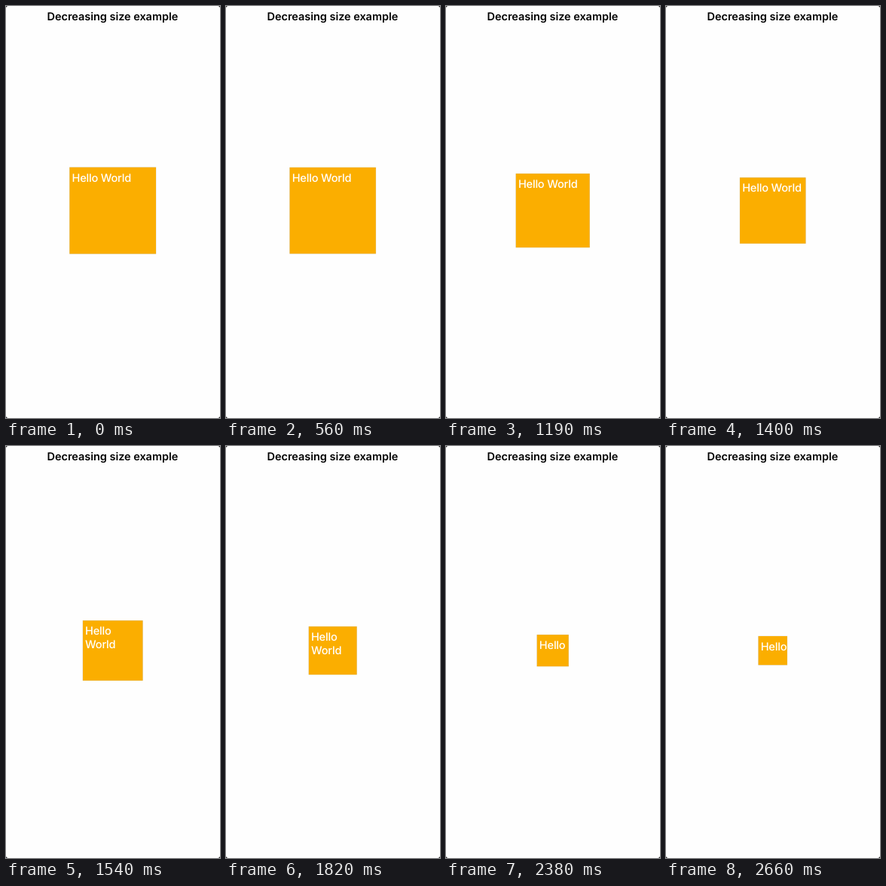
Write an HTML page that moves like this. It is 284 px wide and 546 px high and loops after 3080 ms.

```html
<!DOCTYPE html>
<html lang="en">
<head>
<meta charset="utf-8">
<style>
  html, body { margin: 0; width: 100%; height: 100%; overflow: hidden; background: #000; }
  svg { display: block; width: 284px; height: 546px; }
  text { font-family: Inter, "Liberation Sans", sans-serif; white-space: pre; text-rendering: geometricPrecision; }
  #title { font-size: 14.5px; font-weight: 600; letter-spacing: -.04px; text-anchor: middle; }
  #label { font-size: 14.6px; font-weight: 500; letter-spacing: -.2px; fill: #fff; }
</style>
</head>
<body>
<svg viewBox="0 0 284 546">
  <rect width="284" height="546" rx="3" fill="#fefefe"/>
  <text id="title" x="141.4" y="19">Decreasing size example</text>
  <rect id="edge" fill="#d3d2cb"/>
  <rect id="box" fill="#fbae00"/>
  <g id="label"><text id="first"></text><text id="second" y="18.1">World</text></g>
</svg>
<script>
const LOOP = 3080, STEP = 70;
const START = 445, DURATION = 2300;
const LARGE = 114.6, SMALL = 38;
const CENTER = { x: 141.7, y: 271.1 };
const WRAP_BELOW = 87, DROP_LINE_BELOW = 43.7;
const get = id => document.getElementById(id);

// cubic-bezier(.42, 0, .58, 1)
function easeInOut(x) {
  let lo = 0, hi = 1;
  for (let i = 0; i < 24; i++) {
    const u = (lo + hi) / 2, v = 1 - u;
    if (3 * v * v * u * .42 + 3 * v * u * u * .58 + u * u * u < x) lo = u;
    else hi = u;
  }
  return lo * lo * (3 - 2 * lo);
}

function setSquare(el, size) {
  el.setAttribute("x", CENTER.x - size / 2);
  el.setAttribute("y", CENTER.y - size / 2);
  el.setAttribute("width", size);
  el.setAttribute("height", size);
}

function draw(now) {
  const t = Math.floor((now % LOOP) / STEP) * STEP;
  const x = Math.min(1, Math.max(0, (t - START) / DURATION));
  const size = LARGE + (SMALL - LARGE) * easeInOut(x);
  const left = CENTER.x - size / 2, top = CENTER.y - size / 2;
  const wrapped = size < WRAP_BELOW;
  setSquare(get("edge"), size + .6);
  setSquare(get("box"), size);
  get("label").setAttribute("transform", `translate(${left + 3.1} ${top + 18.9})`);
  get("first").textContent = wrapped ? "Hello" : "Hello World";
  get("second").style.display = wrapped && size >= DROP_LINE_BELOW ? "" : "none";
}

const begin = performance.now();
function tick() {
  draw(performance.now() - begin);
  requestAnimationFrame(tick);
}
tick();
</script>
</body>
</html>
```
